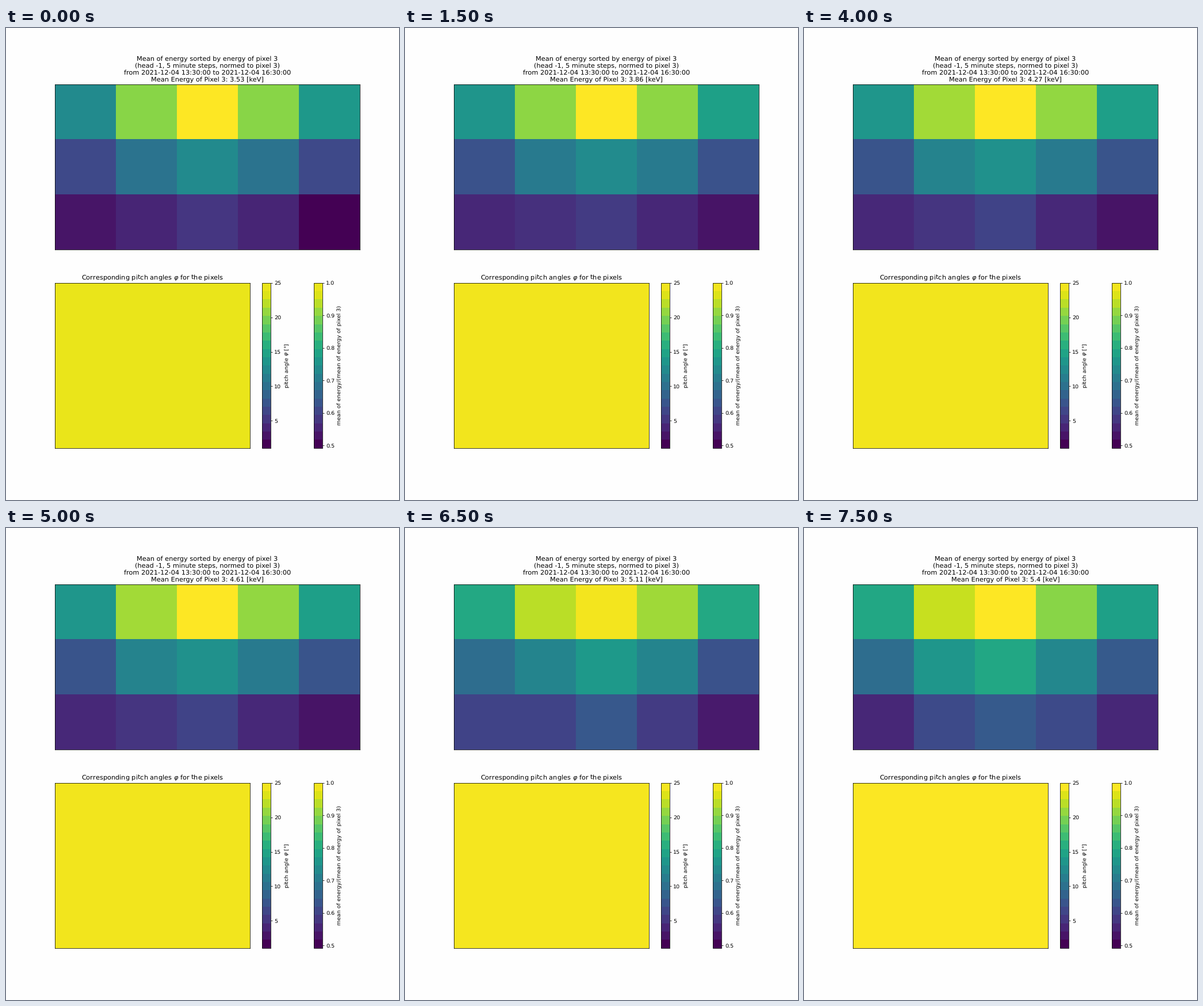
Animation, 683 px wide and 820 px high, one loop 8000 ms. Source, as a matplotlib script:

```python
import numpy as np
import matplotlib.pyplot as plt
from matplotlib.animation import FuncAnimation
from matplotlib.cm import ScalarMappable
from matplotlib.colors import Normalize
from matplotlib.patches import Rectangle

plt.rcParams["text.hinting"] = "none"
plt.rcParams["font.family"] = "DejaVu Sans"

DPI = 68.3
SIZE = (683.01 / DPI, 820.01 / DPI)  # the margin guards against rounding down
STEP_MS = 500
LEVELS = 20

# Mean energy of pixel 3 for each half-second step.
ENERGY = [3.53, 3.55, 3.58, 3.86, 4.26, 4.26, 4.27, 4.27,
          4.27, 4.28, 4.61, 4.97, 5.05, 5.11, 5.13, 5.4]

# First step of each state: colour of the pitch panel, then the 3 x 5 cells as
# positions on the colour map, from 0 to LEVELS - 1.
STATES = {
    0: ("#eae51a", [[9.1, 15.6, 19, 15.6, 10.1],
                    [4.2, 7.2, 9.1, 7.2, 4.2],
                    [1.1, 2, 3, 2, 0]]),
    2: ("#eae51a", [[7.5, 15.5, 19, 15.4, 9.7],
                    [3.9, 7.4, 9.1, 6.8, 3.9],
                    [1.1, 1.1, 3.4, 2, 0]]),
    3: ("#f2e51d", [[9.9, 15.8, 19, 15.8, 10.8],
                    [4.8, 7.8, 9.2, 7.8, 4.8],
                    [2.1, 2.6, 3.3, 2.1, 1]]),
    8: ("#f2e51d", [[10, 16.4, 19, 15.9, 10.7],
                    [4.9, 8.5, 9.6, 7.8, 4.9],
                    [2.2, 2.9, 3.8, 2.2, 1]]),
    11: ("#f5e61f", [[11.5, 17, 18.7, 16.3, 11.5],
                     [6.8, 8.6, 10.2, 8.6, 4.8],
                     [3.8, 3.8, 5.2, 3.3, 1.4]]),
    14: ("#f5e61f", [[13, 17.7, 18.7, 15.2, 10.3],
                     [8.3, 10.3, 10.3, 8.3, 5.2],
                     [4.5, 5.2, 5.2, 3.8, 2.2]]),
    15: ("#fbe723", [[11.4, 17.4, 19, 15.6, 10.8],
                     [6.8, 10, 11.4, 8.8, 5.4],
                     [2.1, 4.3, 5.4, 4.3, 2.1]]),
}


def state_at(step):
    """Return the pitch colour and the cell grid for a step."""
    fill, grid = STATES[max(s for s in STATES if s <= step)]
    grid = np.array(grid)
    if step == 1:  # halfway between its neighbours
        grid = (grid + np.array(STATES[2][1])) / 2
    return fill, grid


def add_bar(low, high, label):
    """Add a stepped colour bar and return its top segment."""
    cmap = plt.get_cmap("viridis", LEVELS)
    bar = fig.colorbar(ScalarMappable(Normalize(low, high), cmap),
                       ax=pitch_ax, label=label)
    top = Rectangle((0, 1 - 1 / LEVELS), 1, 1 / LEVELS, lw=0,
                    transform=bar.ax.transAxes)
    bar.ax.add_patch(top)
    return top


def add_title_line(text, row):
    """Place a heading line above the cells, row 0 being the lowest."""
    return cell_ax.annotate(text, (0.5, 1), xycoords="axes fraction",
                            xytext=(0, 6 + 12.53 * row),
                            textcoords="offset points",
                            ha="center", va="baseline", fontsize=12)


fig, (cell_ax, pitch_ax) = plt.subplots(2, 1, figsize=SIZE, dpi=DPI,
                                        facecolor="#fefefe")

cells = cell_ax.imshow(state_at(0)[1], cmap="viridis", vmin=0,
                       vmax=LEVELS - 1, aspect="auto",
                       interpolation="nearest")
for ax in (cell_ax, pitch_ax):
    ax.set_xticks([])
    ax.set_yticks([])

add_title_line("Mean of energy sorted by energy of pixel 3", 3)
add_title_line("(head -1, 5 minute steps, normed to pixel 3)", 2)
add_title_line("from 2021-12-04 13:30:00 to 2021-12-04 16:30:00", 1)
energy_text = add_title_line("", 0)

pitch_ax.set_title(r"Corresponding pitch angles $\varphi$ for the pixels")
bar_tops = [
    add_bar(0.492, 1, "mean of energy/(mean of energy of pixel 3)"),
    add_bar(1.03, 25, r"pitch angle $\varphi$ [°]"),
]


def draw(step):
    fill, grid = state_at(step)
    cells.set_data(grid)
    energy_text.set_text(f"Mean Energy of Pixel 3: {ENERGY[step]} [keV]")
    pitch_ax.set_facecolor(fill)
    for top in bar_tops:
        top.set_facecolor(fill)
    return [cells, energy_text, *bar_tops]


anim = FuncAnimation(fig, draw, frames=len(ENERGY), interval=STEP_MS,
                     repeat=True, repeat_delay=0, blit=False)
plt.show()
```
